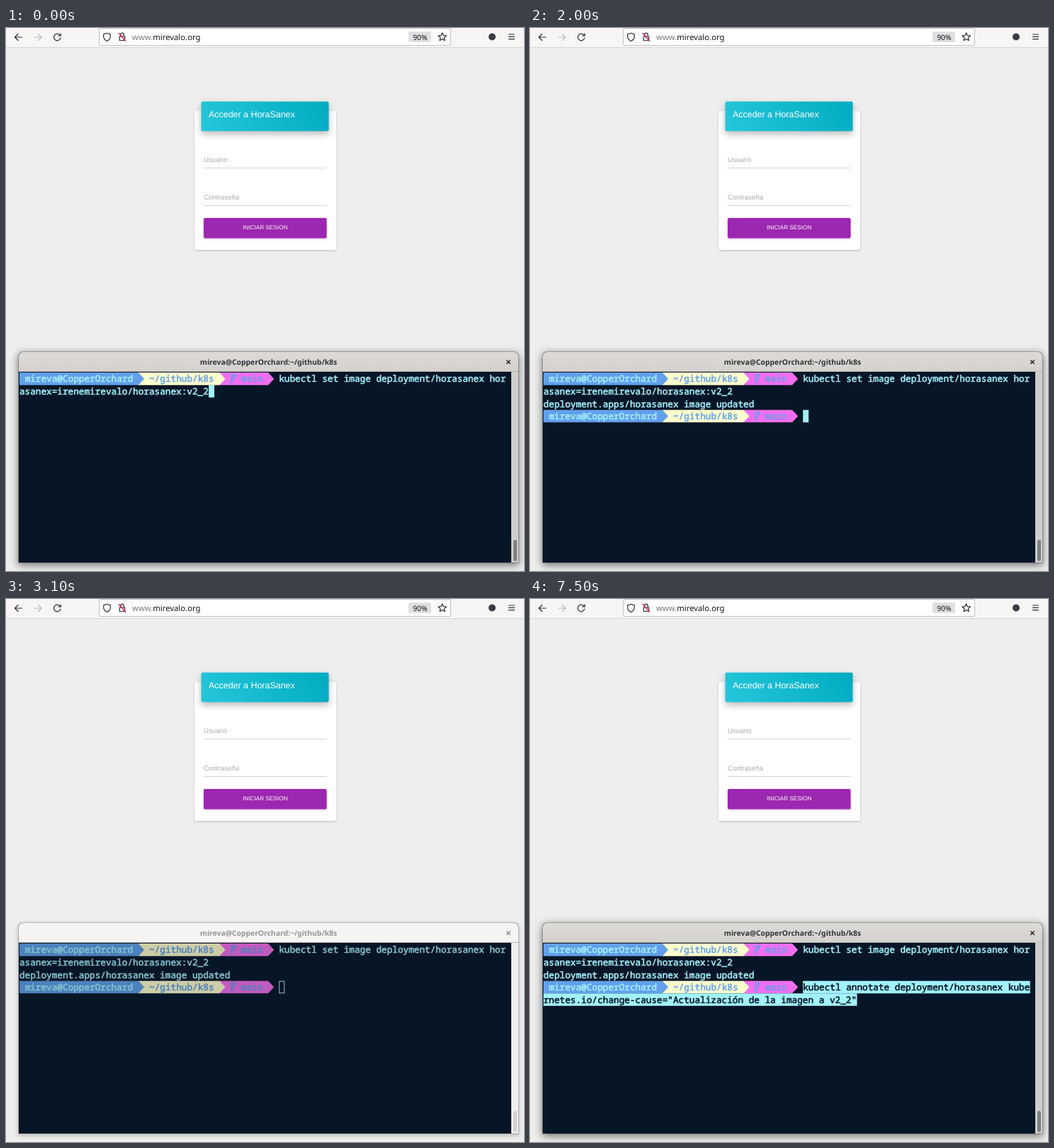
These frames come from a looping animation (731 px wide and 766 px high, 8 s). An HTML page:

```html
<!DOCTYPE html>
<html lang="es">
<head>
<meta charset="utf-8">
<title>Terminal</title>
<style>
html, body { margin: 0; width: 100%; height: 100%; overflow: hidden; background: #eee; }
#stage {
  position: relative; width: 731px; height: 766px; overflow: hidden; background: #eee;
  --blue: #62a0ec; --yellow: #ffffcd; --pink: #f26eee; --ink: #a2f1fc;
  --head: linear-gradient(#dedad7, #d5d1cd); --title: #2f3437;
  --shadow: 0 0 0 1px rgba(0,0,0,.23), 0 3px 12px 1px rgba(0,0,0,.5);
}
#stage.dim {
  --blue: #4d81bd; --yellow: #cdcda7; --pink: #c25abf; --ink: #84c3ce;
  --head: #f5f4f2; --title: #929594;
  --shadow: 0 0 0 1px rgba(0,0,0,.18), 0 2px 6px 1px rgba(0,0,0,.22);
}
#stage div, svg { position: absolute; }
svg { left: 0; top: 0; }
text { white-space: pre; text-rendering: geometricPrecision; }
.bar { left: 0; top: 0; width: 731px; height: 27px; background: #f7f6f5; border-bottom: 1px solid #d9d8d7; }
.url { left: 131px; top: 0; width: 495px; height: 23px; background: #fff; border: 1px solid #bfbfc4; border-radius: 2px; }
.zoom { left: 568px; top: 5px; width: 32px; height: 15px; background: #e0e0e2; border-radius: 2px; }
.card { left: 265.5px; top: 117px; width: 200px; height: 196px; background: #fff; border-radius: 3px; box-shadow: 0 1px 3px rgba(0,0,0,.22); }
.banner { filter: drop-shadow(0 5px 5px rgba(0,0,0,.2)) drop-shadow(0 2px 6px rgba(0,0,0,.08)); }
.button { fill: #9c27b0; filter: drop-shadow(0 1px 1.5px rgba(156,39,176,.4)); }
.window { left: 18px; top: 457px; width: 705px; height: 297px; border-radius: 6px 6px 0 0; background: #071626; box-shadow: var(--shadow); overflow: hidden; }
.head { left: 0; top: 0; width: 100%; height: 28px; background: var(--head); border-bottom: 1px solid #bab5b0; box-sizing: border-box; }
#track { left: 695px; top: 28px; width: 10px; height: 269px; }
#thumb { left: 716px; top: 722px; width: 4.5px; height: 30px; border-radius: 3px; }
.ui { font-family: "Noto Sans", "Open Sans", sans-serif; }
.web { font-family: "Liberation Sans", Arial, sans-serif; }
.mono { font: 12.71px "Noto Sans Mono", "DejaVu Sans Mono", monospace; }
.mono text { stroke-width: .55; }
.icon { fill: none; stroke: #2b2a33; stroke-width: 1.2; stroke-linecap: round; stroke-linejoin: round; }
</style>
</head>
<body>
<div id="stage">
  <div class="bar"></div>
  <div class="url"></div>
  <div class="zoom"></div>
  <div class="card"></div>
  <div class="window"><div class="head"></div><div id="track"></div></div>
  <div id="thumb"></div>
  <svg width="731" height="766" viewBox="0 0 731 766">
    <linearGradient id="teal" gradientUnits="userSpaceOnUse" x1="290" y1="168" x2="441" y2="81">
      <stop stop-color="#26c6da"/><stop offset="1" stop-color="#00acc1"/>
    </linearGradient>
    <rect class="banner" x="275.500" y="103.700" width="180" height="41.900" rx="2" fill="url(#teal)"/>
    <rect class="button" x="279" y="268" width="173.500" height="28.500" rx="2"/>
    <g class="icon">
      <path d="M22.500 13H12.500M17 8.500L12.500 13L17 17.500"/>
      <path d="M40 13H50M45.500 8.500L50 13L45.500 17.500" stroke="#b9b9bd"/>
      <path d="M76.300 10.300A4.800 4.800 0 1 0 77 14M77.300 7.800V11H74"/>
      <path d="M142.500 7.200L147.300 8.900V11.500C147.300 15 145.500 17.200 142.500 18.500C139.500 17.200 137.700 15 137.700 11.500V8.900Z"/>
      <path d="M160.300 12H167.700V17.500H160.300ZM161.700 12V9.500A2.300 2.300 0 0 1 166.300 9.500V12"/>
      <path d="M159.300 7.500L168.700 18.300" stroke="#d7264c" stroke-width="1.500"/>
      <path id="star"/>
      <path d="M709.500 9H717.500M709.500 12.300H717.500M709.500 15.600H717.500"/>
    </g>
    <circle cx="686" cy="12.500" r="5" fill="#3c3b44"/>
    <g class="ui">
      <text x="178" y="17" font-size="11.300" fill="#15141a"><tspan fill="#7b7a80">www.</tspan>mirevalo.org</text>
      <text x="584.300" y="16.500" font-size="10.300" fill="#15141a" text-anchor="middle">90%</text>
      <text id="title" x="370.500" y="475.300" font-size="10.350" font-weight="bold" text-anchor="middle" style="fill:var(--title)"></text>
    </g>
    <path d="M706.300 468.500L711.700 473.900M711.700 468.500L706.300 473.900" stroke-width="1.600" style="stroke:var(--title)"/>
    <g class="web">
      <text x="286" y="126" font-size="12.450" fill="#fff">Acceder a HoraSanex</text>
      <g font-size="9.700" fill="#aaa">
        <text x="279" y="189.300">Usuario</text>
        <text x="279" y="242">Contraseña</text>
      </g>
      <text x="365.700" y="284.300" font-size="8.200" fill="#fff" text-anchor="middle">INICIAR SESION</text>
    </g>
    <path d="M279 197.500H452M279 250.500H452" stroke="#d2d2d2"/>
    <g id="term" class="mono"></g>
    <rect id="cursor"/>
  </svg>
</div>
<script>
const CELL = 7.63, ROW = 17.56, LEFT = 19, TOP = 486.1, LOOP = 8000;
const NS = 'http://www.w3.org/2000/svg';
const $ = id => document.getElementById(id);
const colX = c => LEFT + c * CELL;
const rowY = r => TOP + r * ROW;
const HOME = 'mireva@CopperOrchard:~/github/k8s';
const COMMAND = ['kubectl set image deployment/horasanex hor', 'asanex=irenemirevalo/horasanex:v2_2'];
const PASTE = ['kubectl annotate deployment/horasanex kube', 'rnetes.io/change-cause="Actualización de la imagen a v2_2"'];

function add(parent, tag, attrs, text) {
  const el = document.createElementNS(NS, tag);
  for (const k in attrs) el.setAttribute(k, attrs[k]);
  if (text) el.textContent = text;
  parent.appendChild(el);
  return el;
}
const group = () => add($('term'), 'g', {});

// The thin outline gives the terminal's light bold
const write = (g, row, col, text, color = 'var(--ink)') =>
  add(g, 'text', { x: colX(col), y: rowY(row) + 13.3, style: `fill:${color};stroke:${color}` }, text);

// Coloured prompt section ending in an arrow
function section(g, row, from, to, color) {
  const y = rowY(row), x = colX(to);
  add(g, 'path', {
    d: `M${colX(from)} ${y}H${x}L${x + CELL + .6} ${y + ROW / 2}L${x} ${y + ROW}H${colX(from)}Z`,
    style: `fill:var(--${color})`
  });
}
function prompt(g, row) {
  section(g, row, 37, 46, 'pink');
  section(g, row, 22, 37, 'yellow');
  section(g, row, 0, 22, 'blue');
  write(g, row, 1, 'mireva@CopperOrchard');
  write(g, row, 24, '~/github/k8s', 'var(--blue)');
  write(g, row, 41, 'main', 'var(--blue)');
  const x = colX(39), y = rowY(row);
  add(g, 'path', {
    d: `M${x + 2} ${y + 1.5}V${y + 16.5}M${x + 6} ${y + 3.5}V${y + 7.5}L${x + 2} ${y + 11.5}M${x + 4} ${y + 5}L${x + 6} ${y + 2.5}L${x + 8} ${y + 5}`,
    style: 'fill:none;stroke:var(--blue);stroke-width:1.8'
  });
}

const first = group(), output = group(), second = group(), paste = group();
prompt(first, 0);
write(first, 0, 48, COMMAND[0]);
write(first, 1, 0, COMMAND[1]);
write(output, 2, 0, 'deployment.apps/horasanex image updated');
prompt(second, 3);
PASTE.forEach((line, i) => {
  const col = i ? 0 : 48;
  add(paste, 'rect', {
    x: colX(col), y: rowY(3 + i), width: line.length * CELL, height: ROW, style: 'fill:var(--ink)'
  });
  write(paste, 3 + i, col, line, '#071626');
});

let star = '';
for (let i = 0; i < 10; i++) {
  const r = i % 2 ? 2.8 : 6, a = i * Math.PI / 5;
  star += (i ? 'L' : 'M') + (615.7 + r * Math.sin(a)).toFixed(2) + ' ' + (12.8 - r * Math.cos(a)).toFixed(2);
}
$('star').setAttribute('d', star + 'Z');

// Cursor states: start time, row, column (row -1 is hidden)
const CURSOR = [
  [0, 1, 35], [300, -1, 0], [700, 2, 0], [800, 3, 0], [900, 3, 48], [1300, -1, 0],
  [2000, 3, 48], [2700, -1, 0], [3000, 3, 48], [7300, 4, 58], [7500, -1, 0]
];
const show = (el, on) => { el.style.display = on ? '' : 'none'; };

function render(t) {
  const dim = t >= 3000 && t < 6400;
  const pale = t >= 3100 && t < 6500;
  $('stage').className = dim ? 'dim' : '';
  $('track').style.background = pale ? '#f0efee' : '#cfcecd';
  $('thumb').style.background = !dim ? '#7d8081' : pale ? '#d1d0cf' : '#c5c5c4';
  $('title').textContent = t >= 700 && t < 900 ? COMMAND.join('') : HOME;
  show(output, t >= 800);
  show(second, t >= 900);
  show(paste, t >= 7300);

  const [, row, col] = CURSOR.filter(c => c[0] <= t).pop();
  const cur = $('cursor'), inset = dim ? .5 : 0;
  show(cur, row >= 0);
  cur.setAttribute('x', colX(col) + inset);
  cur.setAttribute('y', rowY(row) + inset);
  cur.setAttribute('width', CELL + .3 - 2 * inset);
  cur.setAttribute('height', ROW - 2 * inset);
  cur.style.fill = dim ? 'none' : 'var(--ink)';
  cur.style.stroke = dim ? 'var(--ink)' : 'none';
}

const start = performance.now();
function tick() {
  render((performance.now() - start) % LOOP);
  requestAnimationFrame(tick);
}
tick();
</script>
</body>
</html>
```
